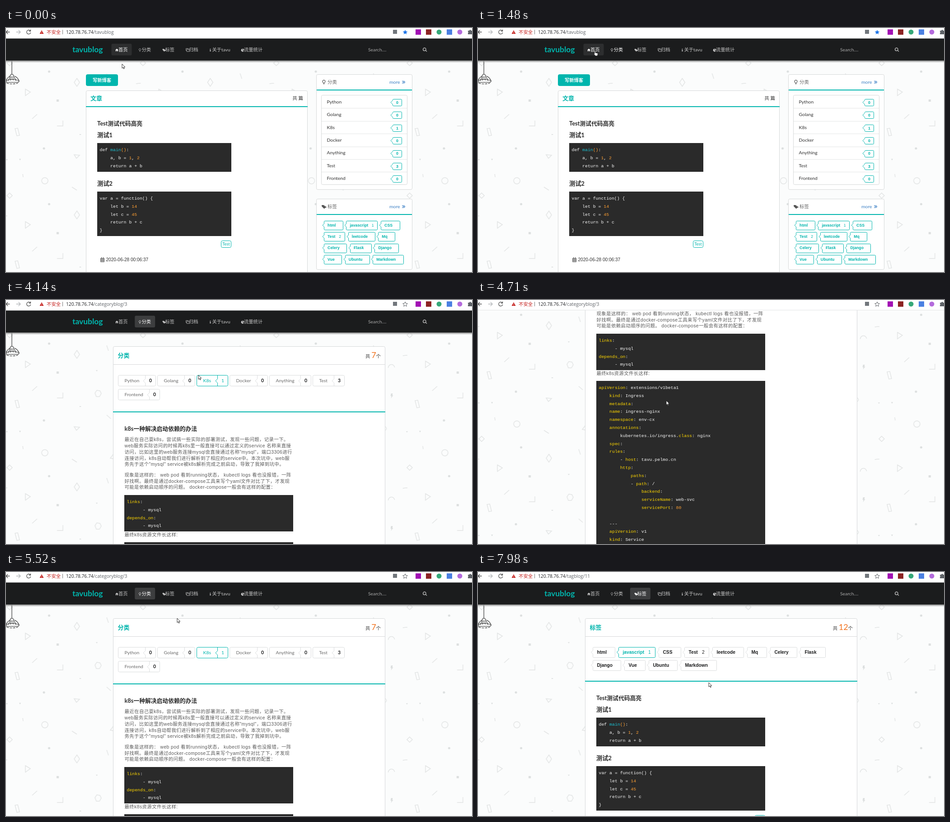
Write an HTML page that moves like this. It is 1032 px wide and 543 px high and loops after 8 s.

```html
<!DOCTYPE html>
<html lang="zh">
<head>
<meta charset="utf-8">
<title>tavublog</title>
<style>
  html, body { margin: 0; width: 100%; height: 100%; overflow: hidden; background: #fbfcfc; }
  svg { display: block; width: 1032px; height: 543px; font-family: Lato, "Noto Sans CJK SC", "Noto Sans CJK JP", "Noto Sans CJK", sans-serif; }
  .sans { font-family: "Liberation Sans", "Noto Sans CJK SC", "Noto Sans CJK JP", "Noto Sans CJK", sans-serif; }
  .para { letter-spacing: .42px; }
  .bar { font-family: "Open Sans", "Noto Sans CJK SC", "Noto Sans CJK JP", "Noto Sans CJK", sans-serif; }
  .code { font-family: "Liberation Mono", monospace; font-size: 9.83px; fill: #f8f8f8; }
  .code .n { fill: #ffa033; }
  .code .k { fill: #ffd700; }
  .code .f { fill: #1cc3d4; }
  .b { font-weight: 700; }
  .mid { text-anchor: middle; }
  .end { text-anchor: end; }
  .line { fill: none; stroke-linecap: round; stroke-linejoin: round; }
  .nav { fill: #c4c4c4; color: #c4c4c4; }
  .nav.on { fill: #fff; color: #fff; }
  .nav rect.back { fill: none; }
  .page, .hide { display: none; }
  .page.show { display: inline; }
</style>
</head>
<body>
<svg viewBox="0 0 1032 543">
  <defs>
    <pattern id="doodle" width="295.3" height="295" patternUnits="userSpaceOnUse">
      <g fill="none" stroke="#e2e4e4" stroke-width="1.5">
        <path d="M157 112l6 9-6 9-6-9zM43 136l11 6.500-11 8zM126 206v12h-13M58 202l11-10M20 224l6-1 4 16-6 1zM151 282l12 1-7 7zM37 30l1 7M146 59l11 7M8 72l6 6-6 6-6-6zM223 101l4 12M223 256l9 8M231 57l10-13v15zM256 151a7 7 0 0 1 14-1M288 124l7.300-1M-7 124l10-1M201 201l7 1 3 6-4 7-7 0-3-8z"/>
        <circle cx="86" cy="45" r="7"/>
        <circle cx="248" cy="286" r="4"/>
      </g>
      <g fill="#dcdfdf">
        <path d="M112 159h5v5h-5zM199 156h4l-2 3zM29 291h4l-2 4zM0 292h4l-2 3zM163 236h3v2h-3zM262 208h4l-1 4h2l-5 7 1-5h-2z"/>
        <circle cx="84" cy="268" r="2.500"/>
        <circle cx="95.500" cy="97" r="2.500"/>
      </g>
    </pattern>
    <linearGradient id="shade" x2="0" y2="1">
      <stop stop-color="#888"/><stop offset="1" stop-color="#aaa" stop-opacity="0"/>
    </linearGradient>
  </defs>
  <g id="scroll">
    <rect width="1032" height="1000" fill="#fbfcfc"/>
    <rect width="1032" height="1000" fill="url(#doodle)"/>
    <g id="pages"></g>
    <g class="line" stroke="#222" stroke-width="1.1">
      <path d="M13 73v30M9 108q0-5 4-5t4 5M9 107q-7 4-9 11 0 3 4 3h20q5 0 5-3-2-7-10-11M0 117q14-5 29 0M9 109l-4 8M12 108l-2 8M15 108l1 8M18 109l4 8"/>
      <path d="M2 123q12 3 24 0" stroke-dasharray="4 3"/>
    </g>
    <rect y="72.500" width="1032" height="5" fill="url(#shade)"/>
    <rect y="23.500" width="1032" height="49" fill="#1b1c1d"/>
    <g id="nav"></g>
  </g>
  <g id="chrome">
    <rect width="1032" height="23" fill="#fff"/>
    <path d="M0 22.500h1032" stroke="#e2e4e5"/>
    <g class="line" stroke="#555" stroke-width="1.3">
      <path d="M8 9H0M4 5L0 9l4 4"/>
      <path d="M23 9h8M28 5l4 4-4 4" stroke="#b5b8bb"/>
      <path d="M54 6.500a4.500 4.500 0 1 0 .5 4M54.500 4v3h-3"/>
    </g>
    <path d="M79 5l4.500 8h-9z" fill="#c5221f"/>
    <path d="M79 8v2M79 11v1" stroke="#fff"/>
    <rect x="857" y="4" width="9" height="9" fill="#72777c"/>
    <path id="star" d="M884 4l1.500 3.500 3.800.4-2.900 2.500.9 3.700-3.300-2-3.300 2 .9-3.700-2.900-2.500 3.800-.4z"/>
    <rect x="907" y="3" width="12" height="12" fill="#a211b4"/>
    <rect x="930" y="3" width="12" height="12" fill="#8c2323"/>
    <circle cx="959" cy="9" r="5.500" fill="#35a878"/>
    <rect x="976" y="3" width="12" height="12" fill="#4b80e2"/>
    <circle cx="1005" cy="9" r="5.500" fill="#b46bdc"/>
    <path d="M1023 6h3a2 2 0 0 1 4 0h3v8h-10v-3a2 2 0 0 0 0-3z" fill="#5f6368"/>
  </g>
  <g id="cursor" stroke="#222" stroke-width=".9" fill="#fff" stroke-linejoin="round">
    <path id="arrow" d="M0 0v9.500l2.200-2 1.500 3.400 1.500-.7-1.500-3.200h3z"/>
    <path id="hand" d="M-1 1q1-1.500 2 0v4l4 .8q1.500.4 1.300 2l-.8 4.200h-4.500l-3.200-4q-.6-1.400.8-1.200l.4.500z"/>
  </g>
</svg>
<script>
const $ = id => document.getElementById(id);
const TEAL = '#00b5ad', EDGE = '#d6d8d9', INK = '#2b2b2b', ORANGE = '#f2711c';

const text = (x, cy, s, size, fill, cls = '') =>
  `<text x="${x}" y="${cy + size * .36}" font-size="${size}" fill="${fill}" class="${cls}">${s}</text>`;
const box = (x, y, w, h, fill = '#fff', stroke = EDGE, r = 3) =>
  `<rect x="${x}" y="${y}" width="${w}" height="${h}" rx="${r}" fill="${fill}" stroke="${stroke}"/>`;
const path = (d, stroke, width = 1, fill = 'none') =>
  `<path d="${d}" stroke="${stroke}" stroke-width="${width}" fill="${fill}"/>`;

// Icons sit in a box about 8 units wide, centred on 0,0.
const outline = d => `<path d="${d}" fill="none" stroke="currentColor" stroke-width=".9"/>`;
const icons = {
  home: '<path d="M-4 0L0-3.500 4 0H3v3.500H1V1h-2v2.500h-2V0z"/>',
  bulb: outline('M-1 2q0-1-1-2a2.400 2.400 0 1 1 4 0q-1 1-1 2zM-1 3.500h2'),
  tags: '<path d="M-4-3h3.500L4 1 .5 4-4-.500zM1-3l4 4-2 2 1-2z"/>',
  clone: outline('M1.500-2V-4H-4v5.500h2M-2-2h6v6h-6z'),
  info: '<path d="M-1-3.500h2v1.500h-2zM-1.500-1H1v3.500h.8v1h-3.500v-1h.8V0h-.6z"/>',
  pie: '<path d="M-.5-3.500V.5l3 2.500a4 4 0 1 1-3-6.500zM.5-3.500a4 4 0 0 1 3 5L.5 0z"/>',
  find: '<path d="M2 2l3 3M3 0a3.200 3.200 0 1 1-6.400 0 3.200 3.200 0 0 1 6.400 0z" fill="none" stroke="currentColor" stroke-width="1.500"/>'
};
const icon = (name, x, y, fill, scale = 1) =>
  `<g transform="translate(${x} ${y}) scale(${scale})" fill="${fill}" color="${fill}">${icons[name]}</g>`;

const paint = line => line
  .replace(/\b\d+\b/g, '<tspan class="n">$&</tspan>')
  .replace(/\w+(?=:)/g, '<tspan class="k">$&</tspan>')
  .replace('main()', '<tspan class="f">main</tspan><tspan class="n">()</tspan>');

function code(x, y, w, h, source) {
  const rows = source.split('\n').map((line, i) => {
    const indent = line.search(/\S|$/);
    return `<text x="${x + 5.5 + indent * 5.9}" y="${y + 18 + i * 17.8}" class="code">${paint(line.trim())}</text>`;
  });
  return `<rect x="${x}" y="${y}" width="${w}" height="${h}" fill="#2a2a2a"/>` + rows.join('');
}

const pySource = 'def main():\n    a, b = 1, 2\n    return a + b';
const jsSource = 'var a = function() {\n    let b = 14\n    let c = 45\n    return b + c\n}';
const linksSource = 'links:\n      - mysql\ndepends_on:\n      - mysql';
const yamlSource = `apiVersion: extensions/v1beta1
    kind: Ingress
    metadata:
    name: ingress-nginx
    namespace: env-cx
    annotations:
        kubernetes.io/ingress.class: nginx
    spec:
    rules:
        - host: tavu.pelmo.cn
        http:
            paths:
            - path: /
                backend:
                serviceName: web-svc
                servicePort: 80

    ---
    apiVersion: v1
    kind: Service`;

const testPost = (x, y, w) =>
  text(x, y, 'Test测试代码高亮', 12.8, INK, 'b') +
  text(x, y + 26.5, '测试1', 13.2, INK, 'b') +
  code(x, y + 44, w, 64, pySource) +
  text(x, y + 134.5, '测试2', 13.2, INK, 'b') +
  code(x, y + 152, w, 99, jsSource) +
  box(x + w - 22.5, y + 261.5, 22, 15, '#fff', TEAL) +
  text(x + w - 11.5, y + 269, 'Test', 9.2, TEAL, 'mid');

const story = [
  '最近在自己耍k8s，尝试搞一些实际的部署测试，发现一些问题，记录一下。',
  'web服务实际访问的时候再k8s里一般直接可以通过定义的service 名称来直接',
  '访问，比如这里的web服务连接mysql会直接通过名称"mysql"，端口3306进行',
  '连接访问，k8s自动帮我们进行解析到了相应的service中。本次坑中，web服',
  '务先于这个"mysql" service被k8s解析完成之前启动，导致了我掉到坑中。',
  '现象是这样的： web pod 看到running状态， kubectl logs 看也没报错，一阵',
  '好找啊。最终是通过docker-compose工具来写个yaml文件对比了下，才发现',
  '可能是依赖启动顺序的问题。 docker-compose一般会有这样的配置：'
];
const k8sPost =
  text(262.5, 286, 'k8s一种解决启动依赖的办法', 12.8, INK, 'b') +
  story.map((s, i) => text(262.5, 310.5 + i * 13.8 + (i > 4 ? 9.5 : 0), s, 10.4, '#5a5a5a', 'sans para')).join('') +
  code(262, 434, 374, 81, linksSource) +
  text(262.5, 522, '最终k8s资源文件长这样:', 10.4, '#5a5a5a', 'sans para') +
  code(262, 539, 374, 460, yamlSource);

const tagNames = 'html javascript CSS Test leetcode Mq Celery Flask Django Vue Ubuntu Markdown'.split(' ');
const tagWidths = [49, 81, 49, 54, 69, 43, 59, 55, 62, 46, 63, 79];
const tagCounts = { javascript: 1, Test: 2 };

// Outlines snap to whole pixels so that they stay crisp.
function tagShape(x, cy, w, h, p, stroke) {
  const left = Math.round(x) + .5, top = Math.round(cy - h / 2) + .5;
  const wide = Math.round(w) - 4, high = Math.round(h) - 4;
  return path(`M${left + 2} ${top}h${wide}q2 0 2 2v${high}q0 2-2 2h${-wide}q-2 0-2-2V${cy + p}` +
    `l${-p} ${-p} ${p} ${-p}V${top + 2}q0-2 2-2z`, stroke, 1, '#fff');
}
function tagCloud(x0, cy0, perRow, rowHeight, k, look) {
  let x;
  return tagNames.map((name, i) => {
    if (i % perRow === 0) x = x0;
    const cy = cy0 + Math.floor(i / perRow) * rowHeight, w = tagWidths[i] * k, [edge, ink] = look(name);
    const out = tagShape(x, cy, w, 23 * k, 4 * k, edge) +
      text(x + 9.5 * k, cy - .2, name, 10.2 * k, ink, 'sans b') +
      (tagCounts[name] ? text(x + w - 15 * k, cy - .2, tagCounts[name], 10.2 * k, ink, 'sans') : '');
    x += w + 4 + 4 * k;
    return out;
  }).join('');
}

const cats = [['Python', 248, 84, 0], ['Golang', 335, 84, 0], ['K8s', 422, 70, 1], ['Docker', 495, 85, 0],
  ['Anything', 583, 93, 0], ['Test', 679, 71, 3], ['Frontend', 248, 93, 0]];
const catY = i => i < 6 ? 179.5 : 210.5;

const sideHead = (y, name, label) =>
  icon(name, 704, y + 17.5, '#555', 1.2) + text(712, y + 17.5, label, 10.4, '#666') +
  text(849, y + 17, 'more', 10.4, '#3b7fc4') +
  path(`M877.500 ${y + 14.500}l3 3-3 3M880.500 ${y + 14.500}l3 3-3 3`, '#3b7fc4', 1.2) +
  path(`M688 ${y + 35}h211`, TEAL, 2);

const homePage =
  box(177.5, 103.5, 70, 25, TEAL, TEAL) + text(212.5, 116, '写新博客', 10.3, '#fff', 'b mid') +
  box(177.5, 139.5, 490, 900) + path('M177 175h491', TEAL, 2) +
  text(187, 156, '文章', 13, TEAL, 'b') + text(658, 156, '共 篇', 10.4, INK, 'end') +
  testPost(202, 212, 297) +
  path('M209.500 512.500h8v8h-8zM209.500 515h8M212 512v8M215 512v8M209.500 517.700h8M211.500 510v3M215.500 510v3', '#444', .9) +
  text(221.5, 515.5, '2020-06-28 00:06:37', 10.1, '#333', 'sans') +
  box(687.5, 103.5, 212, 256) + sideHead(103, 'bulb', '分类') +
  box(698.5, 149.5, 190, 199) +
  cats.map(([name, , , count], i) => {
    const cy = 164 + i * 28.4;
    return text(710.5, cy, name, 10.4, '#333') + tagShape(856, cy + 1.5, 20, 15, 4.5, TEAL) +
      text(866.5, cy + 1.5, count, 8.9, TEAL, 'sans b mid') +
      (i ? path(`M699 ${Math.round(cy - 14) + .5}h189`, '#e4e6e6') : '');
  }).join('') +
  box(687.5, 380.5, 212, 157) + sideHead(380, 'tags', '标签') +
  tagCloud(704, 439, 3, 25.2, .855, () => [TEAL, TEAL]);

const listPage = (title, total, split, bottom, body) =>
  box(237.5, 103.5, 602, bottom - 103.5) + path('M238 143.500h601', EDGE) +
  path(`M237 ${split}h603`, TEAL, 2) + text(247.5, 123, title, 13, TEAL, 'b') +
  `<text x="830" y="129" class="end" font-size="10.4" fill="${INK}">共 <tspan font-size="18" fill="${ORANGE}">${total}</tspan>个</text>` + body;

const catPage = (chosen, bottom, post) => listPage('分类', 7, 249, bottom,
  cats.map(([name, x, w, count], i) => {
    const cy = catY(i), on = name === chosen, edge = on ? TEAL : '#dadcdd';
    return box(x + .5, cy - 12, w - 1, 24, '#fff', edge) +
      path(`M${x + w - 23.5} ${cy - 12}v8l-4.500 4.500 4.500 4.500v7`, edge) +
      text(x + 14.5, cy, name, 10.4, on ? TEAL : '#6a6a6a') +
      text(x + w - 12, cy, count, 10.4, on ? TEAL : '#1b1c1d', on ? 'mid' : 'b mid');
  }).join('') + post);

const tagPage = (chosen, bottom, post) => listPage('标签', 12, 243, bottom,
  tagCloud(254, 178.5, 8, 28.8, 1, name => name === chosen ? [TEAL, TEAL] : ['#dadcdd', '#1b1c1d']) + post);

const pages = {
  home: { url: '/tavublog', nav: 0, art: homePage },
  cat1: { url: '/categoryblog/1', nav: 1, art: catPage('Python', 269.5, '') },
  cat3: { url: '/categoryblog/3', nav: 1, art: catPage('K8s', 1040, k8sPost) },
  tag10: { url: '/tagblog/10', nav: 2, art: tagPage('html', 264.5, '') },
  tag11: { url: '/tagblog/11', nav: 2, art: tagPage('javascript', 1040, testPost(262, 280, 374)) }
};
$('pages').innerHTML = Object.entries(pages)
  .map(([id, p]) => `<g id="${id}" class="page">${p.art}</g>`).join('') +
  '<rect id="hover" rx="3" height="24" fill="none" stroke="#8c8c8c"/>';

const menu = [['首页', 'home', 245.5, 249], ['分类', 'bulb', 296.5, 300.5], ['标签', 'tags', 350, 352.5],
  ['归档', 'clone', 402, 405], ['关于tavu', 'info', 452.5, 456.5], ['流量统计', 'pie', 524.5, 527]];
const tabX = i => 233.5 + i * 51.7;
$('nav').innerHTML = text(147, 48, 'tavublog', 17.4, TEAL, 'b') +
  menu.map(([label, name, ix, tx], i) =>
    `<g class="nav"><rect class="back" x="${tabX(i)}" y="35" width="45" height="26" rx="3"/>` +
    icon(name, ix, 49, 'currentColor', .85) + text(tx, 48, label, 10.3, 'currentColor') + '</g>').join('') +
  text(802, 48, 'Search....', 10.4, '#a9a9a9') + icon('find', 927, 47.5, '#b4b4b4');
const tabs = [...document.querySelectorAll('.nav')];

$('chrome').insertAdjacentHTML('beforeend',
  text(90, 9, '不安全', 10.4, '#c5221f', 'bar') + path('M125.500 4v10', '#777') +
  `<text x="133" y="12.700" font-size="10.2" class="bar" fill="#202124">120.78.76.74<tspan id="url" fill="#5f6368"></tspan></text>`);

const visits = [[0, 'home'], [670, 'cat1'], [1480, 'home'], [2110, 'cat1'], [3720, 'cat3'], [5910, 'tag10'], [6990, 'tag11']];

// Each move: first step, last step, number of steps, destination.
const pointerMoves = [
  [150, 270, 2, 306, 50], [880, 1360, 5, 259, 50], [1720, 1960, 3, 306, 50], [2200, 2660, 4, 420, 90],
  [2780, 3050, 3, 470, 184], [3170, 3290, 2, 458, 180], [3840, 4140, 3, 426, 167], [4260, 4710, 5, 417, 224],
  [4830, 5520, 6, 379, 103], [5640, 5790, 2, 358, 50], [6030, 6870, 7, 345, 178], [7110, 7980, 8, 511, 246]
];
const scrollMoves = [[4260, 4710, 5, 359], [4830, 5310, 5, 0]];

function follow(t, start, moves) {
  let at = start;
  for (const [t0, t1, n, ...to] of moves) {
    if (t < t0) break;
    const step = Math.floor(Math.min(1, (t - t0) / (t1 - t0)) * (n - 1) + 1e-6) + 1;
    at = at.map((v, i) => v + (to[i] - v) * step / n);
  }
  return at;
}

function draw() {
  const t = performance.now() % 8000;
  const [x, y] = follow(t, [257, 80], pointerMoves);
  const scroll = Math.round(follow(t, [0], scrollMoves)[0]);
  const id = visits.filter(v => v[0] <= t).pop()[1], page = pages[id];

  for (const key in pages) $(key).classList.toggle('show', key === id);
  $('scroll').setAttribute('transform', `translate(0 ${-scroll})`);
  $('url').textContent = page.url;
  $('star').setAttribute('style', page.nav ? 'fill:none;stroke:#5f6368' : 'fill:#1a73e8');

  const overTab = y > 35 && y < 61 ? menu.findIndex((m, i) => x > tabX(i) && x < tabX(i) + 45) : -1;
  const fading = t >= 1480 && t < 1600 ? 1 : -1;
  tabs.forEach((tab, i) => {
    const active = i === page.nav;
    tab.classList.toggle('on', active || i === overTab || i === fading);
    tab.firstChild.style.fill = active ? (i ? '#3d3e3f' : '#2d2e2f') : i === overTab ? '#2d2e2f' : 'none';
  });

  const overCat = page.nav === 1 && !scroll
    ? cats.findIndex((c, i) => x > c[1] && x < c[1] + c[2] && Math.abs(y - catY(i)) < 12) : -1;
  const marked = overCat >= 0 && !(id === 'cat3' && overCat === 2);
  $('hover').classList.toggle('hide', !marked);
  if (marked) {
    $('hover').setAttribute('x', cats[overCat][1] + .5);
    $('hover').setAttribute('y', catY(overCat) - 12);
    $('hover').setAttribute('width', cats[overCat][2] - 24);
  }

  const overTag = page.nav === 2 && y > 167 && y < 190 && x > 311 && x < 392;
  const pointing = overTab >= 0 || overCat >= 0 || overTag;
  $('arrow').classList.toggle('hide', pointing);
  $('hand').classList.toggle('hide', !pointing);
  $('cursor').setAttribute('transform', `translate(${x} ${y})`);
  requestAnimationFrame(draw);
}
draw();
</script>
</body>
</html>
```
